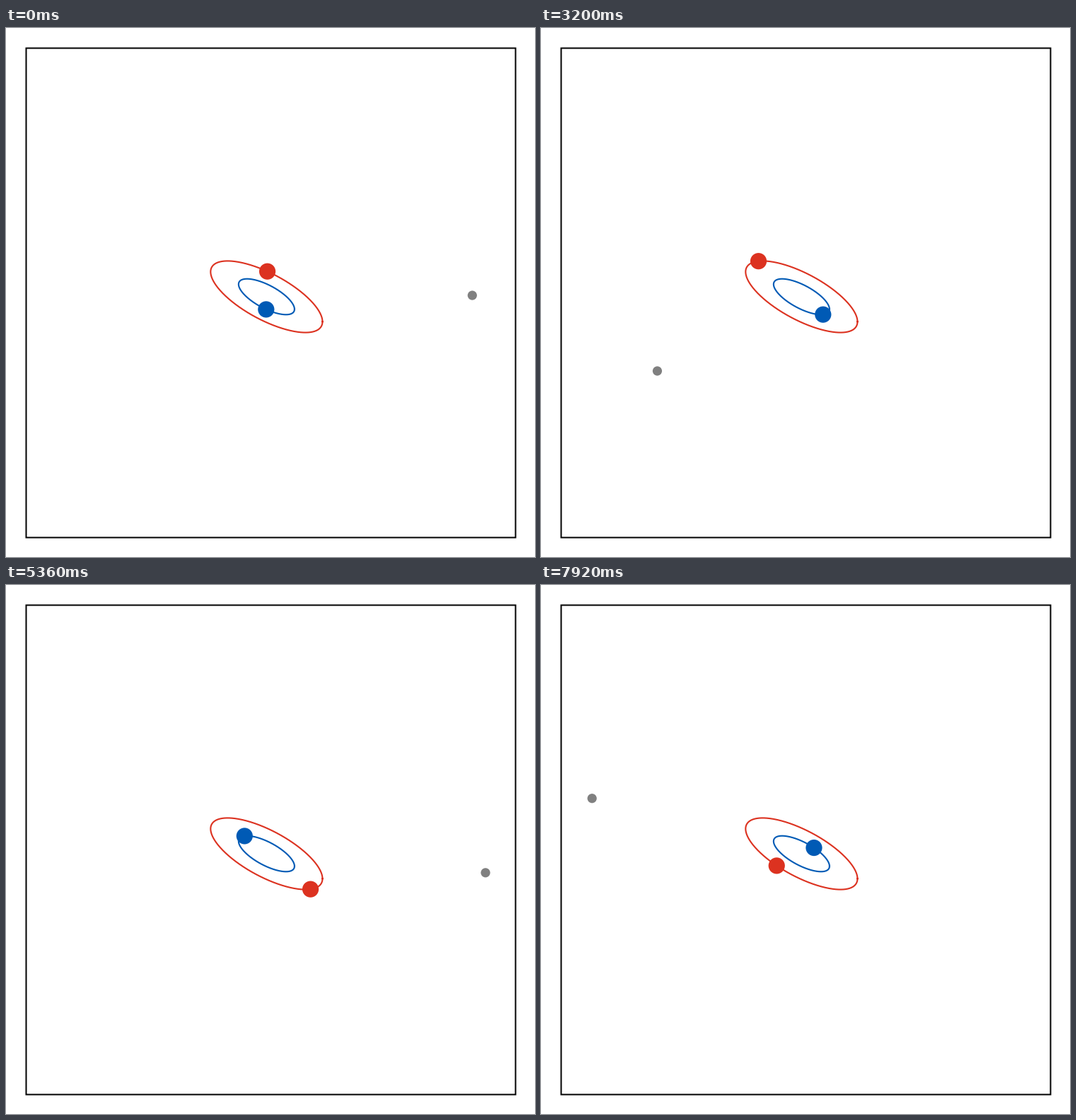
Animation of 748 by 748 pixels, one loop 8000 ms. Source, as a matplotlib script:

```python
import numpy as np
import matplotlib.pyplot as plt
from matplotlib.animation import FuncAnimation
from matplotlib.patches import Circle, Rectangle

SIZE, DPI = 748, 100
FRAMES, INTERVAL = 100, 80
PT = 72 / DPI  # points per pixel
RED, BLUE, GRAY = "#dc3220", "#005ab5", "#808080"

CENTER = np.array([368.4, 380.0])
BINARY_SPEED = -20.056  # degrees per step
OUTER_PERIOD = 67.2     # steps
OUTER_PEAK = 64.95      # step at which the outer body is furthest right


def sim_time(frame):
    """The integrator starts with a very short step, then runs evenly."""
    return max(frame, 1.55 + 0.04 * frame)


def binary_offset(deg):
    """Circular orbit seen at a slant."""
    a = np.radians(deg)
    return np.array([79.1 * np.cos(a), 50.6 * np.cos(a - np.radians(45.9))])


def outer_position(t):
    """Slanted eccentric orbit whose shape drifts slowly with u."""
    a = 2 * np.pi * (t - OUTER_PEAK) / OUTER_PERIOD
    u = (t - FRAMES / 2) / (FRAMES / 2)
    c, s, c2, s2 = np.cos(a), np.sin(a), np.cos(2 * a), np.sin(2 * a)
    x = 382.9 + u + (303.5 + 3 * u) * c + (8 + 3 * u) * s - 4.75 * c2 - 4 * s2
    y = 374.8 - 1.5 * u + (82.3 - 6 * u) * c - (226 - 2 * u) * s - 5 * c2 + 3.5 * s2
    return np.array([x, y])


def positions(frame):
    t = sim_time(frame)
    r = binary_offset(40.2 + BINARY_SPEED * (t - 31))
    return CENTER + r, CENTER - r / 2, outer_position(t)


fig = plt.figure(figsize=(SIZE / DPI, SIZE / DPI), dpi=DPI, facecolor="white")
ax = fig.add_axes([0, 0, 1, 1])
ax.set_xlim(0, SIZE)
ax.set_ylim(SIZE, 0)
ax.axis("off")
ax.add_patch(Rectangle((28.5, 28.5), 692, 692, fill=False, ec="black",
                       lw=2 * PT, snap=False))

curve = binary_offset(np.linspace(0, 360, 400))
for scale, color in ((1, RED), (0.5, BLUE)):
    x, y = CENTER[:, None] + scale * curve
    ax.plot(x, y, color=color, lw=2.1 * PT, zorder=2)

bodies = [
    ax.add_patch(Circle(pos, radius, fc=color, ec="none", zorder=3))
    for pos, radius, color in zip(positions(0), (11.6, 11.6, 6.6),
                                  (RED, BLUE, GRAY))
]


def update(frame):
    for body, pos in zip(bodies, positions(frame)):
        body.center = tuple(pos)
    return bodies


anim = FuncAnimation(fig, update, frames=FRAMES, interval=INTERVAL,
                     repeat=True, repeat_delay=0)
plt.show()
```
